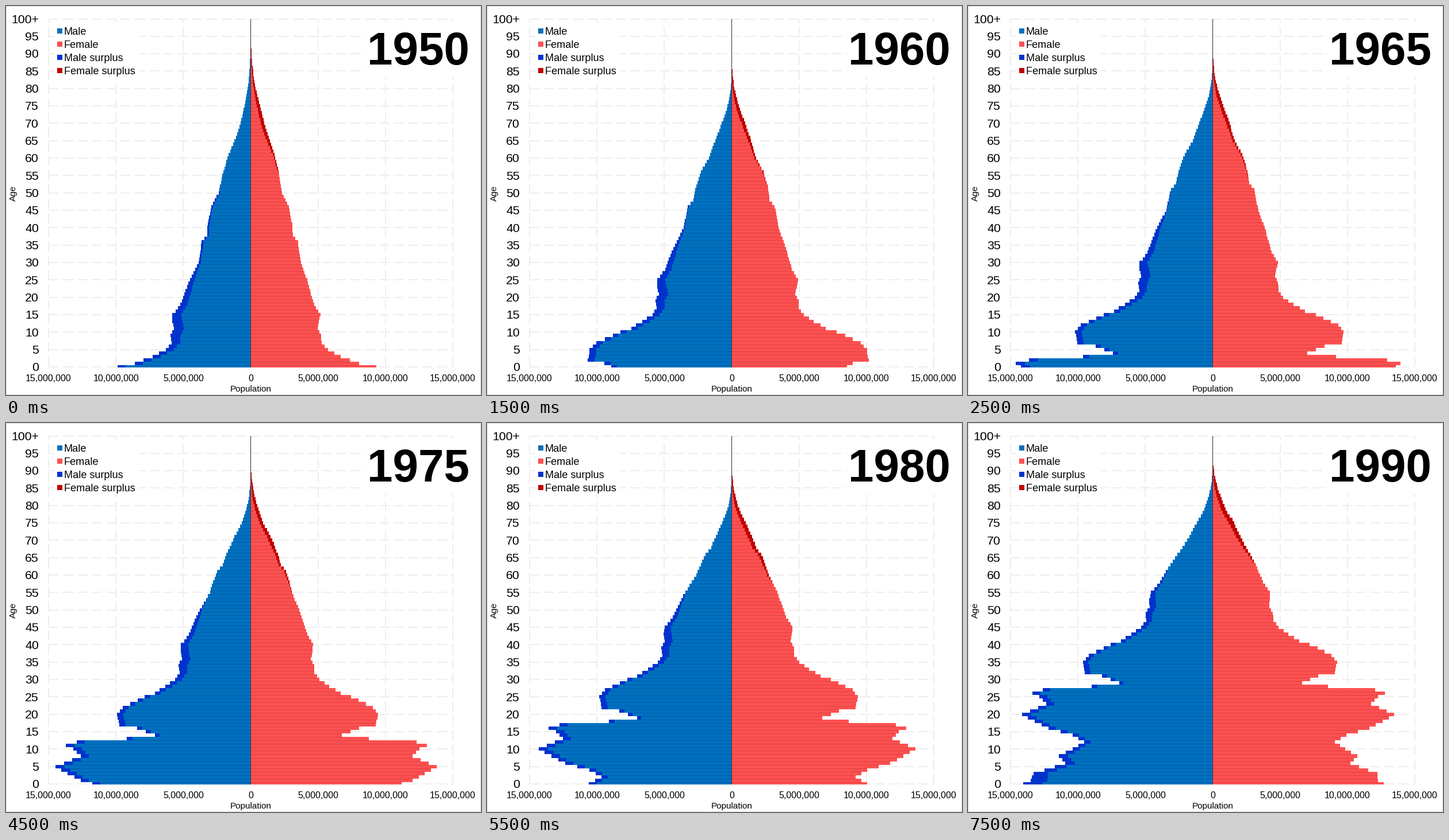
Recreate the animation shown at these times as a matplotlib script. Size 826 by 678 pixels, loop 8 s.

```python
import numpy as np
import matplotlib.pyplot as plt
from matplotlib.animation import FuncAnimation
from matplotlib.patches import Rectangle

W, H = 826, 678
MID, BASE, TOP, STEP = 425.5, 629, 22.5, 6.065   # axis positions in pixels
MALE, FEMALE = "#0070C0", "#FF5050"
MALE_PLUS, FEMALE_PLUS = "#0033CC", "#C00000"

AGES = np.arange(101)
YEARS = range(1950, 1991, 5)

# Female bar lengths at the start, as (age, pixels)
START = [(0, 218.5), (1, 188), (3, 156.5), (5, 134), (7, 123), (9, 122),
         (11, 116), (15, 121), (18, 110), (22, 103), (25, 98), (30, 87),
         (36, 82), (38, 73), (41, 72), (46, 66), (50, 54), (56, 48.5),
         (61, 41), (65, 33), (70, 23.5), (75, 16), (80, 8.5), (85, 4),
         (90, 1.2), (100, .1)]

# Males per female at the start, as (age, ratio)
RATIO = [(0, 1.06), (3, 1.09), (6, 1.11), (10, 1.15), (13, 1.15), (16, 1.115),
         (22, 1.1), (30, 1.04), (50, 1.035), (60, .95), (70, .76), (80, .59),
         (100, .5)]

# Turning points of the births, as (year, pixels)
BIRTHS = [(1951, 234), (1953, 262), (1955, 270), (1958, 258), (1959, 220),
          (1961, 180), (1962, 230), (1963, 319), (1964, 335), (1965, 318),
          (1967, 300), (1968, 312), (1970, 336), (1971, 324), (1974, 284),
          (1976, 240), (1978, 218), (1980, 235), (1982, 256), (1984, 242),
          (1987, 288), (1989, 288), (1990, 297)]

OLD_AGE_LEVEL = (1.4, .52, 1.02, .56)   # mortality of the old in each decade


def along(points, x):
    return np.interp(x, *zip(*points))


def survive(pop, year, old_factor):
    """Carry everyone one year on; `year` is the year they arrive in."""
    age = AGES[:-1]
    care = np.exp(-max(0, year - 1960) / 9)
    level = OLD_AGE_LEVEL[(year - 1951) // 10] * old_factor
    hazard = (.04 * care * np.exp(-age / 3) + .004 * np.sqrt(care)
              + 5.77e-5 * level * np.exp((age + .5) / 10))
    return pop[:-1] * np.exp(-hazard)


def simulate():
    female = along(START, AGES)
    male = female * along(RATIO, AGES)
    history = {1950: (female, male)}
    for year in range(1951, 1991):
        girls = along(BIRTHS, year)
        boys = girls * (1.05 + .06 * (max(0, year - 1975) / 15) ** 2)
        female = np.r_[girls, survive(female, year, 1)]
        male = np.r_[boys, survive(male, year, 1.45)]
        history[year] = female, male
    return history


HISTORY = simulate()

plt.rcParams["font.family"] = "Liberation Sans"
fig = plt.figure(figsize=(W / 72, H / 72), dpi=72, facecolor="white")
ax = fig.add_axes([0, 0, 1, 1])
ax.set(xlim=(0, W), ylim=(H, 0))
ax.axis("off")


def box(x, y, w, h, color, **kw):
    ax.add_patch(Rectangle((x, y), w, h, fc=color, lw=0, **kw))


def label(x, y, text, size, **kw):
    return ax.text(x, y, text, fontsize=size, color="black", **kw)


# Grid and axis labels
dash = dict(color="#EEEEEE", lw=2, ls=(0, (9, 3.5)), zorder=0)
for age in range(0, 101, 5):
    y = BASE - STEP * age
    ax.plot([74, 777], [y, y], **dash)
    label(57, y + 7.3, "100+" if age == 100 else str(age), 21.3, ha="right")
for million in range(-15, 16, 5):
    x = MID + 23.43 * million
    ax.plot([x, x], [BASE, TOP], **dash)
    label(x, 653.7, f"{abs(million) * 10**6:,}", 16, ha="center")
label(MID, 672, "Population", 15.3, ha="center")
label(13, 326, "Age", 15.3, rotation=90, ha="center", va="center")

# White plates behind the legend and the year
box(84, 30, 147, 94, "white", zorder=1)
box(625, 28, 185, 96, "white", zorder=1)
legend = [("Male", MALE), ("Female", FEMALE),
          ("Male surplus", MALE_PLUS), ("Female surplus", FEMALE_PLUS)]
for i, (name, color) in enumerate(legend):
    y = 43.7 + 22.9 * i
    box(89, y - 4.5, 9, 9, color, zorder=2)
    label(100.7, y + 6.2, name, 18.1)
year_text = label(628.3, 102, "", 80, weight="bold")

# Bars
edges = np.clip(BASE - STEP * (np.arange(102) - .5), TOP, 630)


def bars(color, z):
    return ax.stairs(np.full(101, MID), edges, baseline=MID, fill=True,
                     orientation="horizontal", color=color, lw=0, zorder=z)


male_all, female_all = bars(MALE_PLUS, 3), bars(FEMALE_PLUS, 3)
male_core, female_core = bars(MALE, 4), bars(FEMALE, 4)
seams = ax.hlines(edges[1:-1], MID, MID, color="black", alpha=.16, lw=1, zorder=5)
ax.plot([MID, MID], [TOP, BASE + 1], color="#40303A", lw=1, snap=False,
        solid_capstyle="butt", zorder=6)
ax.add_patch(Rectangle((.5, .5), W - 1, H - 1, fill=False, ec="#D9D9D9",
                       lw=1, snap=False))


def draw(frame):
    year = YEARS[(frame + 1) // 2]
    female, male = HISTORY[year]
    core = np.minimum(female, male)
    male_all.set_data(MID - male)
    female_all.set_data(MID + female)
    male_core.set_data(MID - core)
    female_core.set_data(MID + core)
    reach = np.minimum(core[:-1], core[1:])
    seams.set_segments([[(MID - r, y), (MID + r, y)]
                        for r, y in zip(reach, edges[1:-1])])
    year_text.set_text(str(year))
    return male_all, female_all, male_core, female_core, seams, year_text


anim = FuncAnimation(fig, draw, frames=16, interval=500, repeat=True,
                     repeat_delay=0, blit=False)
plt.show()
```
